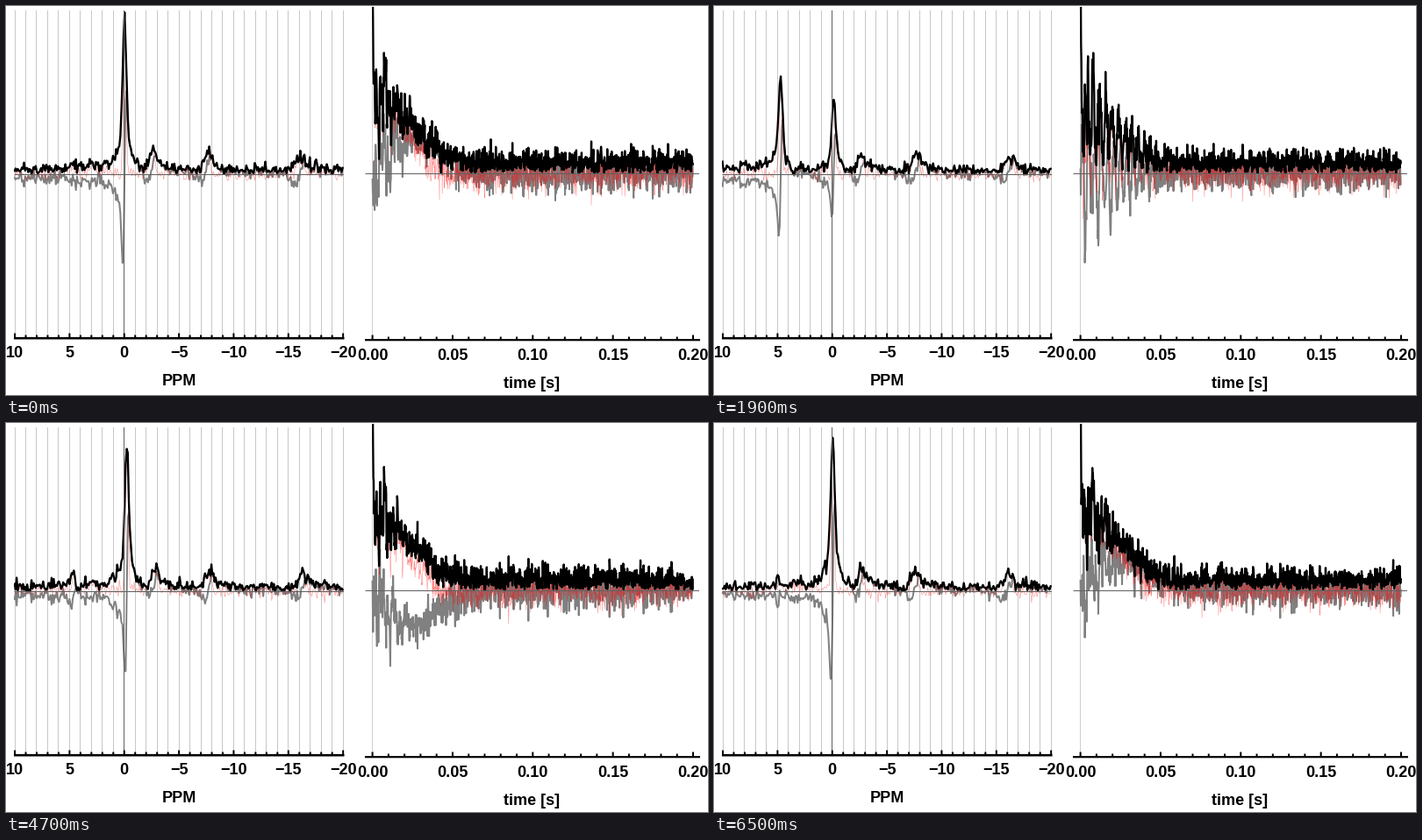
These frames come from a looping animation (800 by 444 pixels, 6600 ms). A matplotlib script:

```python
import numpy as np
import matplotlib
import matplotlib.pyplot as plt
from matplotlib.animation import FuncAnimation
from matplotlib.patches import Rectangle

matplotlib.rcParams["path.simplify"] = False
matplotlib.rcParams["font.family"] = "Liberation Sans"

W, H, DPI = 800, 444, 100
FRAMES, STEP = 66, 100
PX = 72 / DPI

# Acquisition: 1024 complex points in 0.2 s, 31P at 3 T
N, SPAN, HZ = 1024, 0.2, 51.7
t = np.arange(N) * SPAN / N
PEAK, PCR, NOISE = 172, 85, 10.3
REF = -0.13
LEFT, RIGHT = 192.5, 191.5


def envelope(width):
    return np.exp(-(t / width) ** 2)


slow, fast = envelope(0.037), envelope(0.021)
SCALE = PEAK / (PCR * slow.sum())

ppm = np.fft.fftshift(np.fft.fftfreq(N, SPAN / N)) / HZ + REF
keep = (ppm <= 10.05) & (ppm >= -20.05)


def ppm_x(p):
    return 134.75 - 12.47 * p


def time_x(s):
    return 417.6 + 1827 * s


def line(f):
    return np.exp(2j * np.pi * f * t)


def multiplet(shift, weights, j=16):
    mid = (len(weights) - 1) / 2
    return sum(w * line(shift * HZ + (k - mid) * j) for k, w in enumerate(weights))


STATIC = (
    multiplet(-2.5, (12, 13))
    + multiplet(-7.45, (13, 12))
    + multiplet(-16.0, (6, 12, 6))
    + 4 * line(3.0 * HZ)
) * fast + 80 * line(3 * HZ) * np.exp(-t / 0.0006)


def deficit(s):
    """Loss of the main peak: exercise from 0.8 s, recovery from 2.9 s."""
    def loss(u):
        return 130 * (1 - np.exp(-(u - 0.8)))
    if s < 0.8:
        return 0
    if s < 2.9:
        return loss(s)
    return loss(2.9) * np.exp(-(s - 2.9) / 0.65)


def signal(i):
    s = i * STEP / 1000
    rng = np.random.default_rng(310 + i)
    drift = np.interp(s, (0, 1.2, 2.6, 3.7, 4.7, 5.3, 6.5),
                      (5, 1, -2, 3.5, -5.5, -0.5, 4))
    lost = deficit(s)
    pcr = (PEAK - lost) / PEAK * PCR
    pi = (7 + 1.2 * lost) / PEAK * PCR
    fid = (pcr + pi * line(4.85 * HZ)) * slow + STATIC
    fid = fid * line(drift)
    fid += NOISE * (rng.standard_normal(N) + 1j * rng.standard_normal(N))
    half = fid.copy()
    half[0] /= 2
    return fid, np.fft.fftshift(np.fft.fft(half))[keep] * SCALE


fig = plt.figure(figsize=(W / DPI, H / DPI), dpi=DPI, facecolor="white")
ax = fig.add_axes([0, 0, 1, 1])
ax.set_xlim(0, W)
ax.set_ylim(H, 0)
ax.axis("off")


def crisp(v):
    return np.floor(v) + 0.5


def rule(x0, y0, x1, y1, color, width, z):
    ax.plot([x0, x1], [y0, y1], color=color, lw=width * PX, zorder=z,
            solid_capstyle="butt", snap=False)


def label(x, y, text):
    ax.text(x, y, text, fontsize=18 * PX, weight="bold", ha="center",
            va="baseline", zorder=9)


def ticks(xs, base, every):
    for k, x in enumerate(xs):
        rule(x, base, x, base - (5.5 if k % every == 0 else 3.5), "black", 2, 8)


# Spectrum frame
for p in range(-20, 11):
    x = crisp(ppm_x(p))
    rule(x, 5, x, 378, "#c8c8c8", 1, 1)
rule(crisp(ppm_x(0)), 5, crisp(ppm_x(0)), 379, "#606060", 1, 7)
rule(9.5, 192.5, 385, 192.5, "#606060", 1, 7)
rule(9, 379.2, 385.5, 379.2, "black", 2.6, 8)
ticks([ppm_x(p) for p in range(10, -21, -1)], 379, 5)
for p in range(10, -21, -5):
    label(ppm_x(p), 401, str(p).replace("-", "\u2212"))
label(197, 433, "PPM")

# Time frame
rule(417.5, 1, 417.5, 381, "#d0d0d0", 1, 1)
rule(409.5, 191.5, 790, 191.5, "#606060", 1, 7)
rule(409, 381.2, 791, 381.2, "black", 2.2, 8)
ticks([time_x(k / 100) for k in range(21)], 381, 5)
for k in range(5):
    label(time_x(k * 0.05), 403.5, f"{k * 0.05:.2f}")
label(599.5, 436, "time [s]")


def curves(x, clip):
    made = []
    styles = (("#808080", 2, 1), ("red", 0.5, 0.5), ("black", 2.3, 1))
    for z, (color, width, alpha) in enumerate(styles, 3):
        c, = ax.plot(x, x * 0, color=color, lw=width * PX, alpha=alpha, zorder=z)
        c.set_clip_path(Rectangle((clip[0], 1), clip[1] - clip[0], 376,
                                  transform=ax.transData))
        made.append(c)
    return made


spec_curves = curves(ppm_x(ppm[keep]), (9, 385))
fid_curves = curves(time_x(t), (416, 785))


def show(group, base, z):
    for c, v in zip(group, (z.imag, z.real, np.abs(z))):
        c.set_ydata(base - v)


def update(i):
    fid, spec = signal(i)
    show(spec_curves, LEFT, spec)
    show(fid_curves, RIGHT, fid)
    return spec_curves + fid_curves


anim = FuncAnimation(fig, update, frames=FRAMES, interval=STEP,
                     init_func=lambda: update(0), repeat=True, repeat_delay=0)
plt.show()
```
